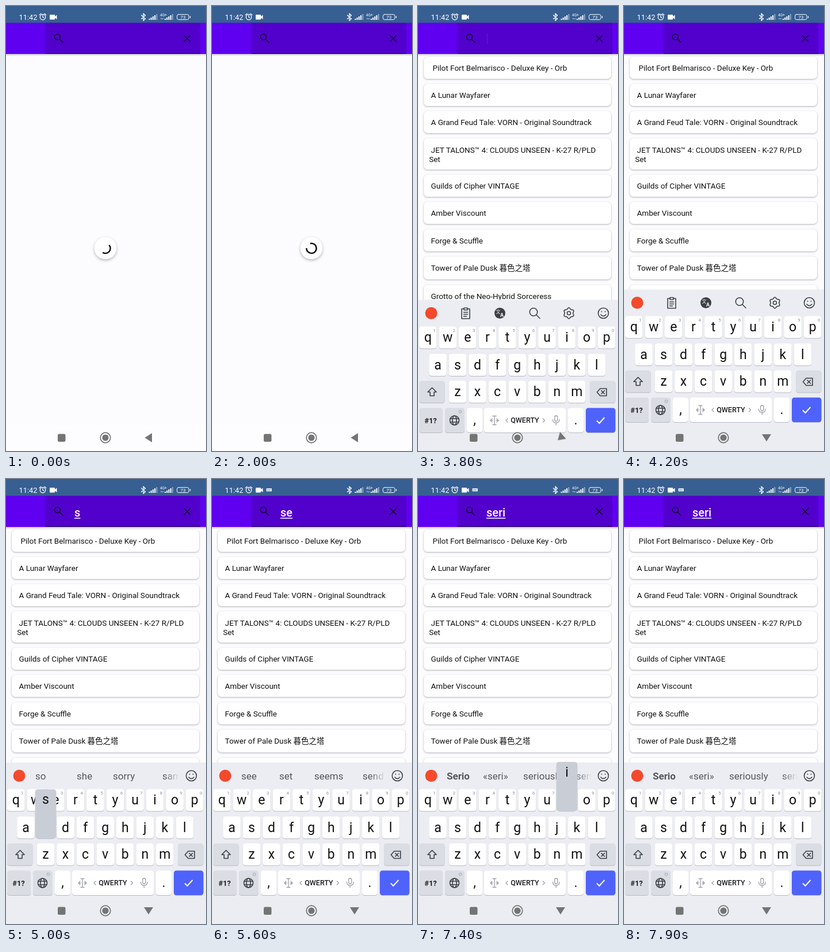
These frames come from a looping animation (348x770 px, 8 s). An HTML page:

```html
<!DOCTYPE html>
<html lang="en">
<head>
<meta charset="utf-8">
<title>Search list</title>
<style>
html, body { margin: 0; width: 100%; height: 100%; overflow: hidden; background: #fcfcff; }
svg { position: absolute; left: 0; top: 0; display: block; }
text { font-family: Roboto, "Noto Sans CJK SC", "Noto Sans CJK", sans-serif; white-space: pre; }
.line { fill: none; stroke: #3c4045; stroke-width: 1.6; stroke-linecap: round; stroke-linejoin: round; }
.white { fill: none; stroke: #fff; stroke-width: 1.3; stroke-linecap: round; stroke-linejoin: round; }
.ink { fill: none; stroke: #16003c; stroke-width: 1.6; }
.card { fill: #fff; filter: drop-shadow(0 1.5px 1.6px rgba(0, 0, 0, .3)); }
.item { font-size: 13.5px; fill: #111; }
.key { fill: #fff; filter: drop-shadow(0 1px .4px rgba(60, 65, 80, .3)); }
.key.dim { fill: #dadde3; }
.key.go { fill: #4f62fb; }
.letter { font-size: 23px; fill: #111; text-anchor: middle; }
.hint { font-size: 8px; fill: #8b9097; text-anchor: middle; }
.word { font-size: 17px; fill: #54575c; }
.typed { font-size: 20px; font-weight: 500; fill: #fff; }
.nav { fill: #747474; }

#spinner { transform-origin: 173px 419px; animation: shrink 8s step-end infinite; }
#keyboard { animation: rise 8s step-end infinite; }
#back { transform-origin: 248px 747px; animation: turn 8s step-end infinite; }
#caret { animation: blink 8s step-end infinite; }
@keyframes shrink {
  0% { transform: none; }
  27.5% { transform: scale(.6); }
  28.75% { transform: scale(.2); }
  30%, 100% { transform: scale(0); }
}
@keyframes rise {
  0% { transform: translateY(290px); }
  45% { transform: translateY(250px); }
  46.25% { transform: translateY(90px); }
  47.5% { transform: translateY(18px); }
  48.75% { transform: translateY(3px); }
  50%, 100% { transform: none; }
}
@keyframes turn {
  0% { transform: none; }
  46.25% { transform: rotate(-12deg); }
  47.5% { transform: rotate(-42deg); }
  48.75% { transform: rotate(-74deg); }
  50%, 100% { transform: rotate(-90deg); }
}
@keyframes blink {
  0% { opacity: 0; }
  46.25% { opacity: 1; }
  51.25% { opacity: 0; }
  56.25% { opacity: 1; }
  61.25%, 100% { opacity: 0; }
}
</style>
</head>
<body>
<svg width="348" height="770" viewBox="0 0 348 770">
  <defs>
    <linearGradient id="edge">
      <stop offset="0" stop-color="#6000f0"/><stop offset="1" stop-color="#5200cc"/>
    </linearGradient>
    <linearGradient id="under" x2="0" y2="1">
      <stop offset="0" stop-color="#000" stop-opacity=".2"/><stop offset="1" stop-color="#000" stop-opacity="0"/>
    </linearGradient>
    <linearGradient id="fade">
      <stop offset="0" stop-color="#ebedf2" stop-opacity="0"/><stop offset="1" stop-color="#ebedf2"/>
    </linearGradient>
  </defs>

  <rect width="348" height="770" fill="#fcfcff"/>
  <g id="list"></g>
  <rect y="725" width="348" height="45" fill="#fdfdff"/>

  <g id="spinner">
    <circle cx="173" cy="419" r="19.3" fill="#fff" style="filter:drop-shadow(0 2px 2.5px rgba(0,0,0,.28))"/>
    <path id="arc" fill="none" stroke="#0b0b0b" stroke-width="2.4"/>
  </g>

  <!-- status bar -->
  <rect width="348" height="30" fill="#375f92"/>
  <text x="22.5" y="24" font-size="12.8" fill="#fff">11:42</text>
  <g class="white">
    <circle cx="64" cy="19.2" r="4.7"/>
    <path d="M64 16.5v3l2 1M58.2 15.6l2.8-2.4M69.8 15.6l-2.8-2.4"/>
    <path d="M235.5 16l7 6-3.5 3.2V13l3.500 3.200-7 6"/>
    <rect x="297.600" y="14.600" width="20.500" height="9" rx="2.700" stroke-width="1"/>
    <path d="M320.500 17.800v2.600"/>
  </g>
  <path d="M77 15h7a1 1 0 0 1 1 1v2l3.500-2.500v7.500l-3.500-2.500v2a1 1 0 0 1-1 1h-7a1 1 0 0 1-1-1v-6.500a1 1 0 0 1 1-1z" fill="#fff"/>
  <g id="bars" fill="#fff"></g>
  <g fill="#fff" font-size="6.500">
    <text x="268" y="18">4G+</text>
    <path d="M268.500 22.500l1.500-2 1.500 2zM271.500 21.500l1.500 2 1.500-2z" opacity=".7"/>
    <text x="308" y="22" font-size="8" text-anchor="middle">73</text>
  </g>
  <g id="notice">
    <rect x="94.500" y="16" width="9.500" height="5.500" rx="1" fill="#e4ebf4"/>
    <path d="M96 18h6.500M96.500 20h5.500" stroke="#375f92" stroke-width=".8" stroke-dasharray="1 .8"/>
  </g>

  <!-- search bar -->
  <rect y="83" width="348" height="4" fill="url(#under)"/>
  <rect y="29" width="348" height="54" fill="#6000f0"/>
  <rect x="69" y="29" width="269" height="54" fill="#5200cc"/>
  <rect x="66" y="29" width="5" height="54" fill="url(#edge)"/>
  <rect x="69" y="81.600" width="269" height="1.400" fill="#28006a"/>
  <g class="ink">
    <circle cx="89.500" cy="53.500" r="5"/>
    <path d="M93.200 57.200l6.300 6.300M309.500 50.500l11.500 11.500M321 50.500l-11.500 11.500"/>
  </g>
  <rect id="caret" x="120" y="47" width="1.200" height="19" fill="#6d12dc"/>
  <g id="typed"></g>

  <g id="keyboard">
    <rect y="490.500" width="348" height="580" fill="#ebedf2"/>
    <g id="words"></g>
    <rect x="275" y="495" width="27" height="36" fill="url(#fade)"/>
    <rect x="302" y="495" width="46" height="36" fill="#ebedf2"/>
    <circle cx="23" cy="513.500" r="10.500" fill="#f4492c"/>
    <g class="line">
      <circle cx="322.500" cy="513.500" r="9"/>
      <path d="M318 516q4.500 5 9 0M319.500 510.500v.6M325.500 510.500v.6"/>
    </g>
    <g id="tools" class="line">
      <path d="M79 506h-3v17h14v-17h-3M80 504.500h6v3.500h-6zM79.500 512h7M79.500 515.500h7M79.500 519h5"/>
      <circle cx="142.500" cy="513.500" r="9.500" fill="#3c4045" stroke="none"/>
      <text x="135.500" y="514" font-size="8" fill="#fff" stroke="none">文</text>
      <text x="143" y="520" font-size="9" font-weight="700" fill="#fff" stroke="none">A</text>
      <circle cx="201" cy="511.500" r="6.700"/>
      <path d="M206 516.500l6 6"/>
      <path id="gear"/>
      <circle cx="262.500" cy="513.500" r="3"/>
    </g>
    <g id="keys"></g>
    <g class="line">
      <path d="M24.500 642.500l-7.500 7.500h4v6.500h7v-6.500h4z"/>
      <path d="M317 644h11v12.500h-11l-5.500-6.250zM319 647.500l5.500 5.500M324.500 647.500l-5.500 5.500"/>
      <circle cx="63.500" cy="699" r="8"/>
      <ellipse cx="63.500" cy="699" rx="3.600" ry="8"/>
      <path d="M56 696h15M56 702h15"/>
    </g>
    <circle cx="73.500" cy="684" r="2.200" fill="none" stroke="#a5a9b0" stroke-width="1.500" stroke-dasharray="1.200 .6"/>
    <text x="22" y="703.500" font-size="13" font-weight="700" fill="#222" text-anchor="middle">#1?</text>
    <text x="186" y="703" font-size="12.500" font-weight="500" fill="#1c1d20" text-anchor="middle">QWERTY</text>
    <g class="line" style="stroke:#9a9ea6;stroke-width:1.300">
      <path d="M133 692v14M130 691.500h6M130 706.500h6M129 696l-3 3 3 3M137 696l3 3-3 3M126 699h4M136 699h4"/>
      <path d="M156 696l-3 3 3 3M217.500 696l3 3-3 3"/>
      <rect x="237.800" y="691" width="5" height="9.500" rx="2.500"/>
      <path d="M234.500 697.500q0 5.800 5.800 5.800t5.800-5.800M240.300 703.500v3.500"/>
    </g>
    <path d="M311 699.500l4.500 4.500 9-10" fill="none" stroke="#fff" stroke-width="2"/>
    <g id="pops"></g>
  </g>

  <!-- navigation -->
  <rect class="nav" x="90" y="740.500" width="13.500" height="13.500" rx="2.500"/>
  <circle class="nav" cx="173" cy="747" r="5.600"/>
  <circle cx="173" cy="747" r="8.800" fill="none" stroke="#747474" stroke-width="1.700"/>
  <path id="back" class="nav" d="M241.500 747l12.500-8v16z"/>
</svg>
<script>
const LOOP = 8000;
const $ = id => document.getElementById(id);
const sheet = document.head.appendChild(document.createElement('style'));
let spans = 0;

function add(parent, tag, attrs, text) {
  const el = document.createElementNS('http://www.w3.org/2000/svg', tag);
  for (const k in attrs) el.setAttribute(k, attrs[k]);
  if (text) el.textContent = text;
  return parent.appendChild(el);
}

// Shows an element only between two times of the loop.
function during(el, from, to) {
  const name = 'span' + spans++;
  sheet.textContent += `@keyframes ${name}{0%{visibility:hidden}` +
    `${from / 80}%{visibility:visible}${to / 80}%{visibility:hidden}}`;
  el.style.animation = `${name} 8s step-end infinite`;
}

// List: top, height, text, second line
const items = [
  [88, 38, ' Pilot Fort Belmarisco - Deluxe Key - Orb'],
  [135, 38, 'A Lunar Wayfarer'],
  [182, 38, 'A Grand Feud Tale: VORN - Original Soundtrack'],
  [229, 54, 'JET TALONS™ 4: CLOUDS UNSEEN - K-27 R/PLD', 'Set'],
  [292, 38, 'Guilds of Cipher VINTAGE'],
  [339, 38, 'Amber Viscount'],
  [386.5, 38, 'Forge & Scuffle'],
  [433.5, 39.5, 'Tower of Pale Dusk 暮色之塔'],
  [482.5, 38, 'Grotto of the Neo-Hybrid Sorceress'],
  [529.5, 38, 'Series 52 Crossvale Livery Add-On'],
  [577, 38, 'Excavation Organizer 2031 - Copper Errand Orb'],
  [624.5, 38, 'GOLEMS V FABRICA - Outer Emotes Set'],
  [671.5, 38, 'GRIM EMBERS™ V Mantle of the Onyx Duke'],
  [719, 38, '']
];
for (const [y, height, text, more] of items) {
  add($('list'), 'rect', { class: 'card', x: 10, y, width: 326, height, rx: 6.5 });
  const base = y + (more ? 24.5 : height / 2 + 5);
  add($('list'), 'text', { class: 'item', x: text[0] === ' ' ? 22.2 : 22.5, y: base }, text);
  if (more) add($('list'), 'text', { class: 'item', x: 19.2, y: base + 16 }, more);
}
during($('list'), 2100, LOOP);

// Signal bars
for (const x of [248.5, 276])
  for (let i = 0; i < 5; i++)
    add($('bars'), 'rect', { x: x + i * 3.2, y: 22 - i * 2, width: 2, height: 2 + i * 2, opacity: i < 4 ? 1 : .45 });

// Keys
const PITCH = 34.55;
const centers = {};
function key(x, y, width, height, kind = '') {
  add($('keys'), 'rect', { class: 'key ' + kind, x, y, width, height, rx: 4.5 });
}
[['qwertyuiop', 17.2, 555.5], ['asdfghjkl', 34.5, 603], ['zxcvbnm', 69, 649.5]].forEach(([row, x0, cy], r) => {
  [...row].forEach((ch, i) => {
    const cx = x0 + i * PITCH;
    centers[ch] = [cx, cy];
    key(cx - 15.3, cy - 19, 30.6, 38);
    add($('keys'), 'text', { class: 'letter', x: cx, y: cy + 7.5 }, ch);
    if (!r) add($('keys'), 'text', { class: 'hint', x: cx + 11, y: cy - 9.5 }, String((i + 1) % 10));
  });
});
key(2, 630.5, 44.5, 38, 'dim');
key(299, 630.5, 44.5, 38, 'dim');
key(2, 677.5, 41, 42.5, 'dim');
key(47, 677.5, 34, 42.5, 'dim');
key(85, 677.5, 27, 42.5);
key(115, 677.5, 142, 42.5);
key(261, 677.5, 27, 42.5);
key(292, 677.5, 51.5, 42.5, 'go');
add($('keys'), 'text', { class: 'letter', x: 98.5, y: 706 }, ',');
add($('keys'), 'text', { class: 'letter', x: 274.5, y: 706 }, '.');

// Gear outline
let gear = '';
for (let i = 0; i <= 48; i++) {
  const a = i / 48 * 2 * Math.PI, r = 8.3 + 1.1 * Math.cos(6 * a);
  gear += `${i ? 'L' : 'M'}${262.5 + r * Math.sin(a)} ${513.5 - r * Math.cos(a)}`;
}
$('gear').setAttribute('d', gear);

// Typing: press time, text so far, suggestions with their left edges
const strokes = [
  [4900, 's', [51, 'so'], [123, 'she'], [186, 'sorry'], [272, 'same']],
  [5400, 'se', [51, 'see'], [117, 'set'], [178, 'seems'], [262, 'send']],
  [5900, 'ser', [51, 'seriously'], [142, 'server'], [214, 'servers'], [295, 'serve']],
  [7300, 'seri', [50, 'Serio'], [113, '«seri»'], [183, 'seriously'], [275, 'series']]
];
strokes.forEach(([at, text, ...words], i) => {
  const from = at + 100;
  const to = i < 3 ? strokes[i + 1][0] + 100 : LOOP;

  const typed = add($('typed'), 'g', {});
  const label = add(typed, 'text', { class: 'typed', x: 119, y: 65 }, text);
  add(typed, 'rect', { x: 119, y: 67, width: label.getComputedTextLength(), height: 1.5, fill: '#fff' });
  during(typed, from, to);

  const row = add($('words'), 'g', {});
  for (const [x, word] of words)
    add(row, 'text', { class: 'word', x, y: 519.5, 'font-weight': word === 'Serio' ? 700 : 400 }, word);
  during(row, from, to);

  const ch = text[i], [cx, cy] = centers[ch];
  const pop = add($('pops'), 'g', {});
  add(pop, 'rect', { x: cx - 18.5, y: cy - 66, width: 37, height: 85.5, rx: 5, fill: '#c9cdd5' });
  add(pop, 'text', { class: 'letter', x: cx, y: cy - 41 }, ch);
  during(pop, at, at + 200);
});
during($('tools'), 3600, 5000);
during($('notice'), 5400, LOOP);

// Material ease, cubic-bezier(.4, 0, .2, 1)
function ease(x) {
  let lo = 0, hi = 1, s;
  for (let i = 0; i < 20; i++) {
    s = (lo + hi) / 2;
    const bx = 1.2 * s * (1 - s) ** 2 + .6 * s * s * (1 - s) + s ** 3;
    bx < x ? lo = s : hi = s;
  }
  return s * s * (3 - 2 * s);
}

function drawArc(t) {
  const p = .19 + Math.max(0, t - 300) / 1332;
  const turns = Math.floor(p), u = p - turns, swing = 284.4;
  const tail = u > .5 ? swing * ease(2 * u - 1) : 0;
  const head = u < .5 ? swing * ease(2 * u) : swing;
  const start = -97 + 291.6 * p + swing * turns + tail;
  const sweep = 3.6 + head - tail;
  const point = deg => {
    const a = deg * Math.PI / 180;
    return `${173 + 8.6 * Math.cos(a)} ${419.3 + 8.6 * Math.sin(a)}`;
  };
  $('arc').setAttribute('d', `M${point(start)}A8.6 8.6 0 ${sweep > 180 ? 1 : 0} 1 ${point(start + sweep)}`);
}

const begin = performance.now();
function frame() {
  const t = (performance.now() - begin) % LOOP;
  drawArc(Math.floor(t / 100) * 100);
  requestAnimationFrame(frame);
}
frame();
</script>
</body>
</html>
```
